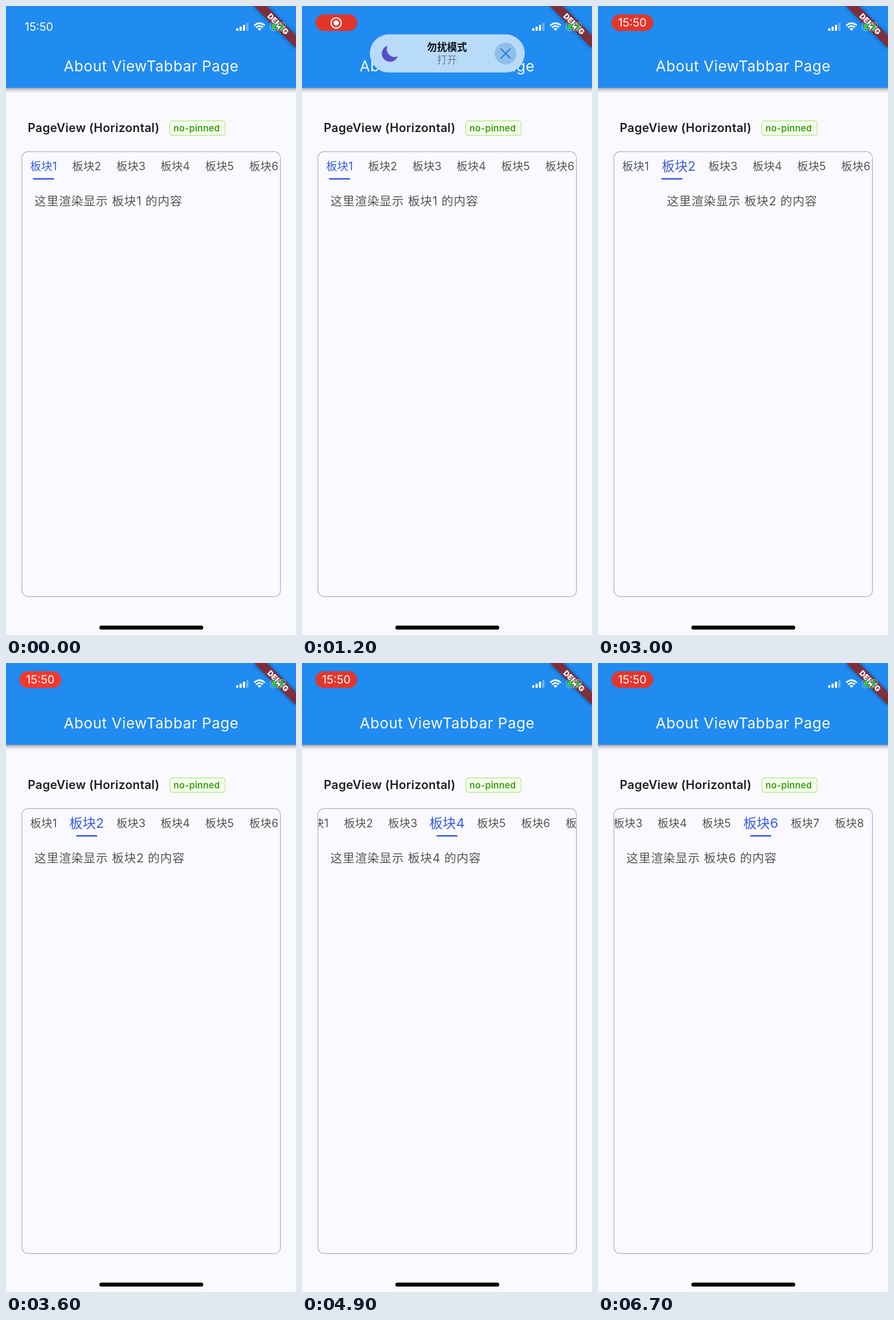
An HTML page that plays this animation: 480 px wide and 1038 px high, repeating every 6.8 s.

```html
<!DOCTYPE html>
<html lang="zh-CN">
<head>
<meta charset="utf-8">
<title>ViewTabbar</title>
<style>
  html, body { margin: 0; width: 100%; height: 100%; overflow: hidden; background: #faf9fd; }
  svg { display: block; width: 480px; height: 1038px; }
  text { font-family: Inter, "Noto Sans CJK SC", "Noto Sans CJK", sans-serif; }
  .mid { text-anchor: middle; }
  .page { font-size: 19.7px; letter-spacing: .65px; fill: #555556; }
  .tab { font-size: 18.4px; }
  .time { font-size: 18.8px; fill: #fff; }
</style>
</head>
<body>
<svg viewBox="0 0 480 1038">
  <defs>
    <linearGradient id="shade" x2="0" y2="1">
      <stop offset="0" stop-color="#404048" stop-opacity=".5"/>
      <stop offset=".45" stop-color="#606068" stop-opacity=".2"/>
      <stop offset="1" stop-color="#606068" stop-opacity="0"/>
    </linearGradient>
    <clipPath id="boxClip"><rect x="26" y="240" width="429" height="735" rx="10"/></clipPath>
    <filter id="blur" x="-30%" y="-30%" width="160%" height="160%"><feGaussianBlur stdDeviation="3"/></filter>
  </defs>

  <rect width="480" height="1038" fill="#faf9fd"/>
  <rect y="135" width="480" height="9" fill="url(#shade)"/>
  <rect width="480" height="135" fill="#208bf1"/>
  <text class="mid" x="240.3" y="108" font-size="24.6" letter-spacing=".5" fill="#f8fbff">About ViewTabbar Page</text>

  <text x="36" y="208" font-size="19.7" font-weight="600" letter-spacing=".28" fill="#1e1e20">PageView (Horizontal)</text>
  <rect x="270.9" y="189.5" width="92" height="24" rx="5" fill="#f4fdea" stroke="#b9ea94" stroke-width="1.3"/>
  <text x="277.3" y="206.7" font-size="14.8" font-weight="600" letter-spacing=".3" fill="#3a9c14">no-pinned</text>

  <g clip-path="url(#boxClip)">
    <g id="pages"></g>
    <g id="tabs"></g>
    <rect id="line" y="284" width="35" height="2.6" rx="1" fill="#385ee2"/>
  </g>
  <rect x="26.3" y="240.4" width="428" height="734.2" rx="10" fill="none" stroke="#b2b2ba" stroke-width="1.2"/>
  <rect x="154.5" y="1022.5" width="172" height="6.4" rx="3.2" fill="#000"/>

  <path d="M410.4 0H431.3L480 48.7V69.6Z" fill="#000" opacity=".5" filter="url(#blur)"/>
  <path d="M410.4 0H431.3L480 48.7V69.6Z" fill="#7d2f3c"/>
  <text class="mid" transform="translate(450.4 29.6) rotate(45)" y="4.5" font-size="12.5" font-weight="900" fill="#fff">DEBUG</text>

  <g fill="#fff">
    <rect x="381" y="36.5" width="3.6" height="4.5" rx="1"/>
    <rect x="386.6" y="34" width="3.6" height="7" rx="1"/>
    <rect x="392.2" y="31" width="3.6" height="10" rx="1"/>
    <rect x="397.8" y="28" width="3.6" height="13" rx="1" opacity=".35"/>
    <path d="M419.6 41.2L416.3 37.6Q419.6 34.8 422.9 37.6Z"/>
  </g>
  <g fill="none" stroke="#fff" stroke-width="2.6">
    <path d="M413.9 35.5Q419.6 30.5 425.3 35.5"/>
    <path d="M410.8 32.2Q419.6 24.4 428.4 32.2"/>
  </g>
  <rect x="437.5" y="27.6" width="25" height="13.2" rx="4" fill="none" stroke="#fff" stroke-opacity=".4" stroke-width="1.2"/>
  <rect x="439.5" y="29.6" width="20" height="9.2" rx="2.4" fill="#36c752"/>
  <path d="M453.2 25.5L444.8 35.6H449.8L447.6 43.4L456.6 32.8H451.4Z" fill="#fff" stroke="#5a3038" stroke-width="1"/>

  <text id="clock" class="time" x="31" y="41">15:50</text>
  <g id="pill">
    <rect id="pillBg" x="22.3" y="13.8" width="69" height="27.4" rx="13.7"/>
    <g id="rec">
      <circle cx="56.6" cy="28" r="8.4" fill="none" stroke="#fff" stroke-width="2"/>
      <circle cx="56.6" cy="28" r="4.4" fill="#fff"/>
    </g>
    <text id="pillTime" class="time mid" x="56.8" y="34.4">15:50</text>
  </g>

  <g id="banner">
    <rect x="112.3" y="46.8" width="256.4" height="63" rx="31.5" fill="#b9dbfa"/>
    <path d="M141.5 65.5A13.6 13.6 0 1 0 158.5 83A13.1 13.1 0 0 1 141.5 65.5Z" fill="#5650c8"/>
    <text class="mid" x="240" y="74" font-size="16.6" font-weight="700" fill="#0d1218">勿扰模式</text>
    <text class="mid" x="240" y="95" font-size="16.6" fill="#6a7c90">打开</text>
    <circle cx="337" cy="78.5" r="18" fill="#90bfea"/>
    <path d="M329.5 71l15 15m0-15l-15 15" stroke="#1c7cdc" stroke-width="2" stroke-linecap="round"/>
  </g>
</svg>
<script>
const LOOP = 6800, STEP = 100, COUNT = 8, PAGE_W = 429, MAX_SCROLL = 157.3;
const FIRST = 2800, EVERY = 830, SLIDE = 400, MOVES = 5;
const GREY = [85, 85, 86], BLUE = [56, 94, 226];
const DIM = [226, 54, 44], BRIGHT = [255, 59, 48];

const $ = id => document.getElementById(id);
const clamp = v => Math.min(1, Math.max(0, v));
const smooth = v => v * v * (3 - 2 * v);
const glide = v => smooth(1 - (1 - v) ** 2);
const out = v => 1 - (1 - v) ** 3;
const ramp = (t, from, to) => clamp((t - from) / (to - from));
const lerp = (a, b, k) => a + (b - a) * k;
const mix = (a, b, k) => `rgb(${a.map((v, i) => Math.round(lerp(v, b[i], k)))})`;
const centre = i => i ? 133.5 + (i - 1) * 73.3 : 62;
const scrollTo = i => Math.min(MAX_SCROLL, Math.max(0, centre(i) - 240));
const fade = (id, v) => $(id).setAttribute("opacity", v);

function addText(parent, cls, str) {
  const el = document.createElementNS("http://www.w3.org/2000/svg", "text");
  el.setAttribute("class", cls);
  el.textContent = str;
  $(parent).append(el);
  return el;
}
const tabs = [], pages = [];
for (let i = 0; i < COUNT; i++) {
  tabs.push(addText("tabs", "tab mid", `板块${i + 1}`));
  pages.push(addText("pages", "page", `这里渲染显示 板块${i + 1} 的内容`));
  tabs[i].setAttribute("y", 6.8);
  pages[i].setAttribute("y", 329.3);
}

// One move per beat, each gliding to the next page.
function position(t) {
  const beat = Math.min(MOVES - 1, Math.max(0, Math.floor((t - FIRST) / EVERY)));
  const from = FIRST + beat * EVERY;
  return beat + glide(ramp(t, from, from + SLIDE));
}

function drawTabs(t) {
  const pos = position(t);
  const a = Math.floor(pos), b = a + 1, k = pos - a;
  const scroll = lerp(scrollTo(a), scrollTo(b), k);
  tabs.forEach((tab, i) => {
    const on = clamp(1 - Math.abs(i - pos));
    const size = 1 + (i ? .2 * on : 0); // the first tab starts unscaled
    tab.setAttribute("transform", `translate(${centre(i) - scroll} 264) scale(${size})`);
    tab.setAttribute("fill", mix(GREY, BLUE, on));
    pages[i].setAttribute("x", 47 + (i - pos) * PAGE_W);
  });
  $("line").setAttribute("x", lerp(centre(a), centre(b), k) - scroll - 17.5);
}

function drawStatus(t) {
  const show = ramp(t, 0, 300), swap = ramp(t, 2700, 3000);
  fade("clock", 1 - show);
  fade("pill", show);
  fade("rec", 1 - swap);
  fade("pillTime", swap);
  const wave = .5 + .5 * Math.cos((t - 2200) / 1800 * 2 * Math.PI);
  $("pillBg").setAttribute("fill", mix(DIM, BRIGHT, smooth(wave) * ramp(t, 600, 1100)));
}

function drawBanner(t) {
  const shown = out(ramp(t, 100, 500)) - smooth(ramp(t, 1600, 2000));
  $("banner").setAttribute("transform", `translate(0 ${-115 * (1 - shown)})`);
}

const start = performance.now();
function frame() {
  const t = Math.floor((performance.now() - start) % LOOP / STEP) * STEP;
  drawTabs(t);
  drawStatus(t);
  drawBanner(t);
  requestAnimationFrame(frame);
}
frame();
</script>
</body>
</html>
```
